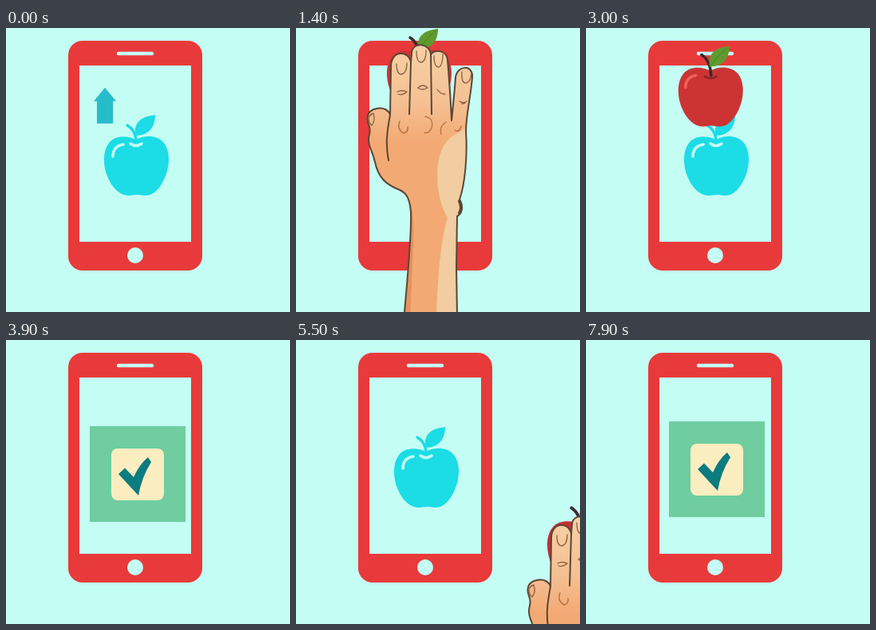
Recreate the animation shown at these times as an HTML page. Size 356 by 356 pixels, loop 8000 ms.

```html
<!DOCTYPE html>
<html lang="en">
<head>
<meta charset="utf-8">
<title>Apple on a phone</title>
<style>
  html, body { margin: 0; height: 100%; overflow: hidden; background: #c4fdf4; }
  svg { display: block; width: 100vw; height: 100vh; }
  .line { fill: none; stroke-linecap: round; stroke-linejoin: round; }
</style>
</head>
<body>
<svg viewBox="0 0 356 356">
  <defs>
    <path id="body" d="M40 4C50-2 66-2 74 7C83 17 83 36 76 52C70 65 62 74 52 74C46 74 45 73 41 73C36 73 36 74 30 74C20 74 10 64 5 52C-2 36-2 17 7 7C15-2 30-1 40 4Z"/>
    <path id="leaf" d="M39-1C37-18 46-25 64-27C64-12 56-1 39-1Z"/>
    <path id="shine" d="M11 25Q11 12 24 10"/>
    <linearGradient id="skin" gradientUnits="userSpaceOnUse" x1="0" y1="30" x2="0" y2="145">
      <stop offset="0" stop-color="#f6cfa3"/>
      <stop offset=".55" stop-color="#f5c093"/>
      <stop offset="1" stop-color="#f3a973"/>
    </linearGradient>
    <mask id="reveal" maskUnits="userSpaceOnUse" x="0" y="0" width="356" height="356">
      <path id="pen" d="M139 160L163 186L181 145" fill="none" stroke="#fff" stroke-width="26" pathLength="1" stroke-dasharray="1 1"/>
    </mask>
  </defs>

  <rect x="78" y="16" width="168" height="288" rx="18" fill="#e83a3a"/>
  <path d="M92 47H232V268H92Z" fill="#c4fdf4"/>
  <path class="line" d="M141 32H183" stroke="#c4fdf4" stroke-width="4.5"/>
  <circle cx="162" cy="285" r="10" fill="#c4fdf4"/>

  <g transform="translate(123 136)" fill="#1cdce6">
    <use href="#body"/>
    <use href="#leaf"/>
    <path class="line" d="M40 3Q38-9 29-14" stroke="#1cdce6" stroke-width="3.5"/>
    <g class="line" stroke="#c4fdf4" stroke-width="3.5">
      <use href="#shine"/>
      <path d="M33 9Q40 14 47 9"/>
    </g>
  </g>

  <path id="arrow" d="M14 0L28 17H24V45H4V17H0Z" fill="#26bdcb"/>

  <g id="apple">
    <use id="flesh" href="#body"/>
    <path class="line" d="M33 11Q41 16 48 11" stroke="#8e2424" stroke-width="2.5"/>
    <path class="line" d="M41 10Q40-9 29-16" stroke="#3a2a2a" stroke-width="3.5"/>
    <use href="#leaf" fill="#5f9a2e"/>
    <path class="line" d="M41-3Q50-16 63-26" stroke="#4b8424" stroke-width="1"/>
    <use href="#shine" class="line" x="-2" stroke="#f0605a" stroke-width="3.5"/>
  </g>

  <g id="hand">
    <path d="M134 420L136 356C140 310 145 260 144 232C143 215 139 207 130 203C112 196 103 187 99 168C96 154 91 150 91 140C91 132 95 130 91 121C87 110 91 103 101 101C110 99 116 103 118 109L119 48C119 28 141 27 144 43L145 31C146 17 168 18 169 34C171 26 189 27 190 40C192 65 194 90 195 116C197 96 199 78 200 62C202 46 222 46 221 61C219 88 213 108 213 130C215 160 212 195 205 215C210 224 208 233 202 236L201 300L203 420Z" fill="url(#skin)"/>
    <path d="M213 125C215 160 212 195 205 215C210 224 208 233 202 236L201 300L203 420H174C176 350 178 275 190 238C175 214 172 165 187 145C195 133 204 132 213 125Z" fill="#f1cda1"/>
    <path d="M144 220C152 250 143 310 142 420H134L136 356C141 310 145 260 144 220Z" fill="#e3935c"/>
    <g class="line" stroke="#5b4636" stroke-width="2">
      <path d="M134 420L136 356C140 310 145 260 144 232C143 215 139 207 130 203C112 196 103 187 99 168C96 154 91 150 91 140C91 132 95 130 91 121C87 110 91 103 101 101C110 99 116 103 118 109M116 166C112 145 114 130 118 109L119 48C119 28 141 27 144 43L142 108M144 43L145 31C146 17 168 18 169 34L170 108M169 34C171 26 189 27 190 40C192 65 194 90 195 116C197 96 199 78 200 62C202 46 222 46 221 61C219 88 213 108 213 130C215 160 212 195 205 215C210 224 208 233 202 236L201 300L203 420"/>
      <path d="M205 217Q209 225 205 232" stroke-width="4"/>
    </g>
    <g class="line" stroke="#8a5f43" stroke-width="1.3">
      <path d="M126 45Q126 58 132 58Q139 57 139 44M151 29Q151 43 157 43Q163 42 163 28M173 35Q173 49 179 49Q184 47 184 33M208 55Q207 69 213 69Q219 68 220 56M97 107Q100 116 95 122Q91 119 91 112Q93 108 97 107"/>
      <path d="M127 80Q133 77 139 80Q133 85 128 83M153 75Q159 69 165 75Q158 79 153 75M177 77Q181 83 187 83M205 92Q210 95 214 92M208 95L212 94"/>
    </g>
    <g class="line" stroke="#b97648" stroke-width="1.5">
      <path d="M130 117Q126 127 135 132Q141 130 140 124M162 111Q173 113 170 125Q167 133 161 131M182 133Q179 124 188 118M199 128Q205 132 207 123"/>
    </g>
  </g>

  <g id="card">
    <path d="M105 108H225V228H105Z" fill="#6fcda0"/>
    <rect x="132" y="136" width="66" height="65" rx="8" fill="#faedbf"/>
    <path d="M141 168L149 160.500L160 172Q167 156 178 147L182 153Q170 172 166 195Z" fill="#0b7c80" mask="url(#reveal)"/>
  </g>
</svg>
<script>
const $ = id => document.getElementById(id);
const part = (t, from, to) => Math.min(1, Math.max(0, (t - from) / (to - from)));
const mix = (a, b, p) => a + (b - a) * p;

function place(id, shown, x, y, more = '') {
  $(id).style.display = shown ? '' : 'none';
  $(id).setAttribute('transform', `translate(${x} ${y}) ${more}`);
}

// Each round: nudge arrow, hand drops the apple, apple slides home, tick is drawn.
const rounds = [
  { drop: [114, 28], size: 1, red: '#cc3434', home: [0, 0],
    start: 1000, hold: 1400, end: 1800, from: [18, 358], to: [-9, 358], card: [0, 0] },
  { drop: [141, 227], size: 1.04, red: '#c22f31', home: [27, 200],
    start: 1400, hold: 1700, end: 2100, from: [261, 0], to: [261, 0], card: [-1, -6] }
];

function draw(time) {
  const t = time % 4000, second = time >= 4000, r = rounds[+second];

  const sway = 42 * Math.sin(t / 200 + (second ? 3.23 : 0.37));
  if (second) place('arrow', t < 1000, 180 + sway, 298 - sway / 7, 'rotate(-90)');
  else place('arrow', t < 1000, 110, 90 - sway);

  const arriving = t < r.hold;
  const away = arriving ? 1 - part(t, r.start, r.hold) : part(t, r.hold, r.end);
  const [dx, dy] = (arriving ? r.from : r.to).map(v => v * away);
  place('hand', t > r.start && t < r.end, r.home[0] + dx, r.home[1] + dy);

  const slide = part(t, 2900, 3400);
  const x = mix(r.drop[0], 123, slide) + (arriving ? dx : 0);
  const y = mix(r.drop[1], 136, slide) + (arriving ? dy : 0);
  place('apple', t > r.start && t < 3500, x, y, `scale(${mix(r.size, 1, slide)})`);
  $('flesh').setAttribute('fill', r.red);

  place('card', t >= 3500, ...r.card);
  $('pen').setAttribute('stroke-dashoffset', 1 - part(t, 3600, 3900));
}

const began = performance.now();
function tick() {
  const now = (performance.now() - began) % 8000;
  draw(Math.floor(now / 100) * 100); // ten pictures a second
  requestAnimationFrame(tick);
}
tick();
</script>
</body>
</html>
```
